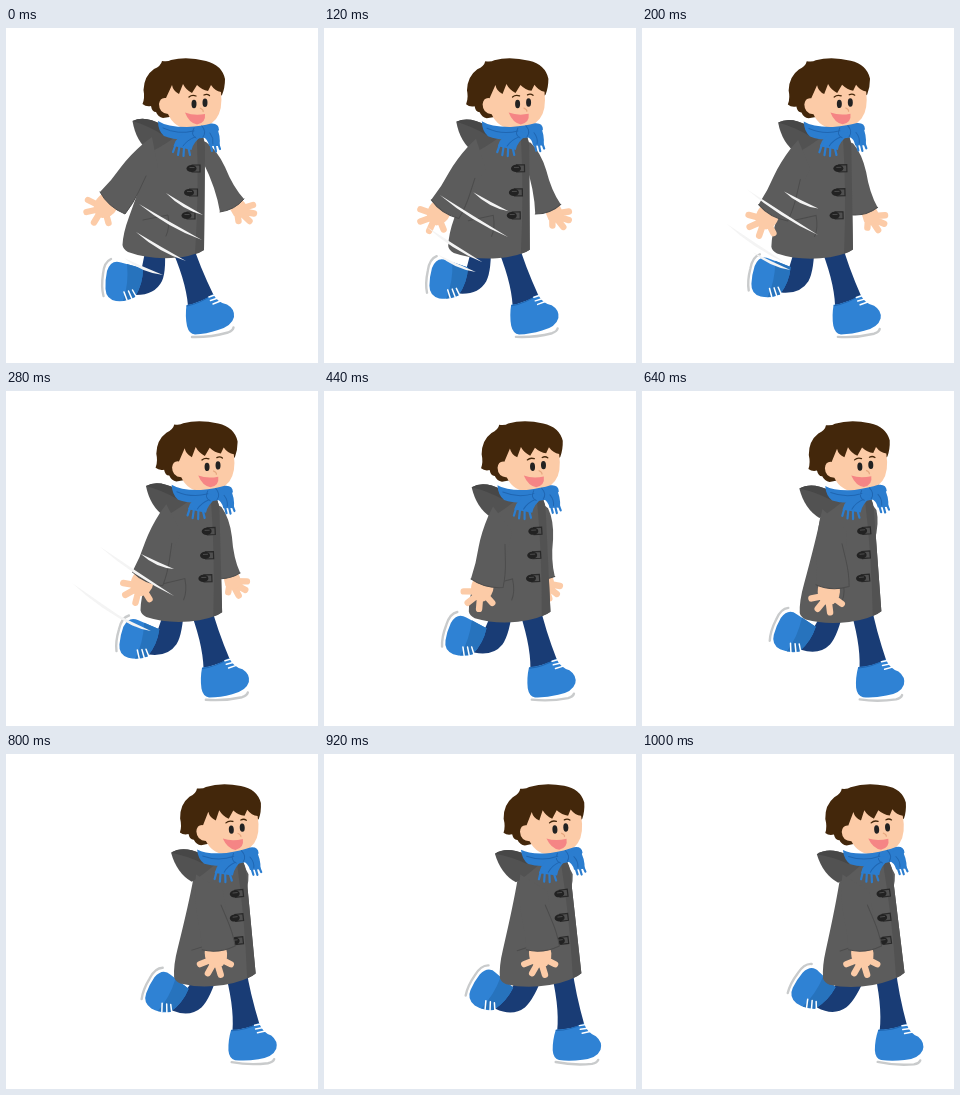
An HTML page for the animation above (1600 ms loop, 312 by 335 pixels).

```html
<!DOCTYPE html>
<html lang="en">
<head>
<meta charset="utf-8">
<title>Skating boy</title>
<style>
  html, body { margin: 0; width: 100%; height: 100%; overflow: hidden; background: #fff; }
  svg { display: block; width: 100vw; height: 100vh; }
  .coat { fill: #5c5c5c; }
  .shade { fill: #525252; }
  .dark { fill: #474747; }
  .seam { fill: none; stroke: #4c4c4c; stroke-width: 1; stroke-linecap: round; }
  .skin { fill: #fccba7; }
  .fingers { fill: none; stroke: #fccba7; stroke-width: 6.4; stroke-linecap: round; }
  .hair { fill: #43270b; }
  .scarf { fill: #2b7dcf; }
  .fringe { fill: none; stroke: #2b7dcf; stroke-width: 2.2; stroke-linecap: round; }
  .fold { fill: none; stroke: #1f66b2; stroke-width: 1; stroke-linecap: round; }
  .trousers { fill: #193c75; }
  .boot { fill: #2f82d4; }
  .cuff { fill: #2773bd; }
  .lace { fill: none; stroke: #fff; stroke-width: 1.5; stroke-linecap: round; }
  .blade { fill: none; stroke: #c9cbcc; stroke-width: 2.4; stroke-linecap: round; }
  .ink { fill: #222; }
  .line { fill: none; stroke: #43270b; stroke-width: 1.3; stroke-linecap: round; }
</style>
</head>
<body>
<svg viewBox="0 0 312 335" preserveAspectRatio="none">
  <g id="farArm">
    <path class="fingers" d="M234 181L247 177M234 183L248 185.500M234 184L243.500 193M231 183L232.500 193"/>
    <path class="skin" d="M221 176L232 169Q241 174 242 183Q238 191 228 188Z"/>
    <path class="coat" d="M190 112L200 114Q211 122 219 139Q227 159 238 171Q229 182 214 184Q210 160 197 134Z"/>
    <path class="seam" d="M238 171Q229 182 214 184"/>
  </g>

  <g id="backLeg">
    <path class="trousers" d="M136 239L141 214L158 212Q161 242 156 253Q149 267 130 267Z"/>
    <path class="boot" d="M101 243Q105 231 115 234.500L137 240.500Q137 256 129 269Q121 274 110 273Q100 271 99.500 261Q99 252 101 243Z"/>
    <path class="cuff" d="M121 236L137 240.500Q137 256 129 269L117 273Q123 256 121 236Z"/>
    <path class="lace" d="M118 264L121 272M122.500 263L126 271M126.500 262L131 270"/>
    <path class="blade" d="M105 231Q98 234 97 246Q95 259 97.500 268"/>
  </g>

  <g id="frontLeg">
    <path class="trousers" d="M163 215L186 214Q193 237 208 268L182 278Q180 252 163 215Z"/>
    <path class="boot" d="M180.500 277Q194 275 207 266Q212 275 221 276.500Q229 281 228 289Q226 298 212 302Q200 306 189 306.500Q183 306 181 298Q179 288 180.500 277Z"/>
    <path class="fold" d="M181 278Q195 275 206 267"/>
    <path class="lace" d="M203 269L210 266.500M204.500 272.500L212 270M207 276L214.500 273"/>
    <path class="blade" d="M186 309Q204 309.500 222 304.500Q227 302.500 227.500 299.500"/>
  </g>

  <g id="coat">
    <path class="coat" d="M148 102L146 121Q139 145 123 189Q117 205 116.500 217Q117 221 122 224Q141 231 165 230Q186 229 198 222L199 122Q200 107 190 100Z"/>
    <path class="shade" d="M191 112Q193 165 189 226Q194 225 198 222L199 122Q199 112 196 108Z"/>
    <path class="seam" d="M137 192L162 187Q164 200 160 208"/>
    <path class="shade" d="M126.500 93Q139 87 156 97L168 110Q152 121 144 124Q130 114 126.500 93Z"/>
    <path class="dark" d="M126.500 93Q139 87 156 97L157 107Q143 98 126.500 93Z"/>
    <g id="toggles"></g>
  </g>

  <g id="head">
    <path class="hair" d="M157 90Q152 89 150 84Q146 84 145 78Q140 79 136.500 76Q139 70 137.500 62Q138 48 148 41Q155 38 156 33Q162 34 165 32Q181 28 200 33Q216 37 219 51Q219 60 216 67L190 85Z"/>
    <path class="skin" d="M160 70L166 57Q167 63 173 66L177 56Q180 62 186 65L191 57Q196 62 202 63L205 57Q209 63 215 64Q217 82 210 91Q201 102 184 101Q168 100 162 86Q153 85 153 76Q154 69 160 70Z"/>
    <path class="line" d="M183 69Q186 66.500 190 68M198 67Q201 65.500 203.500 67.500"/>
    <ellipse class="ink" cx="188" cy="76" rx="2.500" ry="4.200"/>
    <ellipse class="ink" cx="199" cy="74.700" rx="2.500" ry="4.200"/>
    <path d="M194 80Q198 82 197 84" fill="none" stroke="#e6a77f" stroke-width="1.200"/>
    <path d="M179 84.500Q188 88 199 86Q200 95 191 96.500Q183 95 179 84.500Z" fill="#f58585"/>
  </g>

  <g id="scarf">
    <path class="scarf" d="M152 93Q161 99 181 99Q196 98 205 95.500Q213 95 213 102Q208 110 196 110Q172 114 158 108Q152 103 152 93Z"/>
    <path class="scarf" d="M186 102L198 106Q187 114 185.500 122L167.500 118Q171 106 186 102Z"/>
    <path class="scarf" d="M196 101L210 97Q215 108 213.500 118L203 118Q202 111 196 108Z"/>
    <path class="fringe" d="M169.500 117L167 124M173.500 118L172 127M178 119L177.500 128M182.500 120L184 127M204.500 116L206 123M208.500 116L210 123.500M212 115L214 121"/>
    <path class="fold" d="M157 100Q172 107 188 103M188 100Q184 107 190 110M196 98Q201 104 197 109M189 109Q181 112 177 118M204 105Q208 110 207 116"/>
  </g>

  <g id="nearArm">
    <path class="fingers" d="M96 179L82 172M94 181L80.500 184M95 183L88 194.500M99 182L102.500 195"/>
    <path class="skin" d="M96 166L111 181Q106 190 96 190Q86 186 88 177Q90 170 96 166Z"/>
    <path class="coat" d="M146 109L138 115Q124 127 115 139Q106 152 94 164Q102 179 119 186Q127 176 133 163L152 140Z"/>
    <path class="seam" d="M94 164Q102 179 119 186Q127 176 133 163L140 148"/>
  </g>

  <g id="streaks" fill="#f4f4f4"></g>
</svg>

<script>
const LOOP = 1600, MOVE = 1000, STEP = 40, ARM_SWING = 800;
const byId = id => document.getElementById(id);
const lerp = (a, b, k) => a + (b - a) * k;
const clamp = v => Math.max(0, Math.min(1, v));

// Total shift, turn in degrees and pivot of each part
const parts = {
  coat:     { shift: [51.5, 2],  turn: -7.5, pivot: [165, 120] },
  head:     { shift: [48, 0],    turn: -4,   pivot: [180, 95] },
  scarf:    { shift: [50, 0],    turn: -6,   pivot: [180, 105] },
  frontLeg: { shift: [54, 2],    turn: 11,   pivot: [200, 285] },
  backLeg:  { shift: [53, -18],  turn: 28,   pivot: [117, 253] },
  nearArm:  { shift: [52, 0],    turn: -48,  pivot: [160, 112], span: ARM_SWING },
  farArm:   { shift: [52, 0],    turn: 51,   pivot: [194, 118], span: ARM_SWING }
};

// Streak ends at the start and 280 ms later
const streaks = [
  [[160, 165, 197, 187], [135, 163, 168, 178]],
  [[133, 176, 196, 212], [93, 155, 168, 205]],
  [[130, 204, 180, 233], [66, 192, 130, 236]],
  [[118, 230, 157, 247], [108, 222, 145, 240]]
];

byId("toggles").innerHTML = [[187.5, 140.5], [185, 164.5], [182.5, 187.5]].map(([x, y]) => `
  <g transform="translate(${x} ${y})">
    <path d="M-2 -3.500H6.500V3.500H-2" fill="#505050" stroke="#292929" stroke-width="1.200"/>
    <ellipse class="ink" cx="-2" rx="5" ry="3.600"/>
    <path d="M-4 -1H1" stroke="#555" stroke-width=".8"/>
  </g>`).join("");
byId("streaks").innerHTML = "<path/>".repeat(streaks.length);
const streakPaths = [...byId("streaks").children];

// A thin sagging sliver, pointed at both ends
function sliver([x1, y1, x2, y2]) {
  const x = (x1 + x2) / 2, y = (y1 + y2) / 2;
  return `M${x1} ${y1}Q${x - 2} ${y + 6} ${x2} ${y2}Q${x} ${y + 0.5} ${x1} ${y1}Z`;
}

function draw(time) {
  const t = Math.min(MOVE, Math.floor((time % LOOP) / STEP) * STEP);
  const k = t / MOVE;
  for (const [id, { shift, turn, pivot, span = MOVE }] of Object.entries(parts)) {
    const angle = turn * clamp(t / span);
    byId(id).setAttribute("transform",
      `translate(${shift[0] * k} ${shift[1] * k}) rotate(${angle} ${pivot})`);
  }
  streaks.forEach(([from, to], i) =>
    streakPaths[i].setAttribute("d", sliver(from.map((v, j) => lerp(v, to[j], t / 280)))));
  byId("streaks").setAttribute("opacity", clamp((420 - t) / 140));
}

const start = performance.now();
function tick() {
  draw(performance.now() - start);
  requestAnimationFrame(tick);
}
tick();
</script>
</body>
</html>
```
